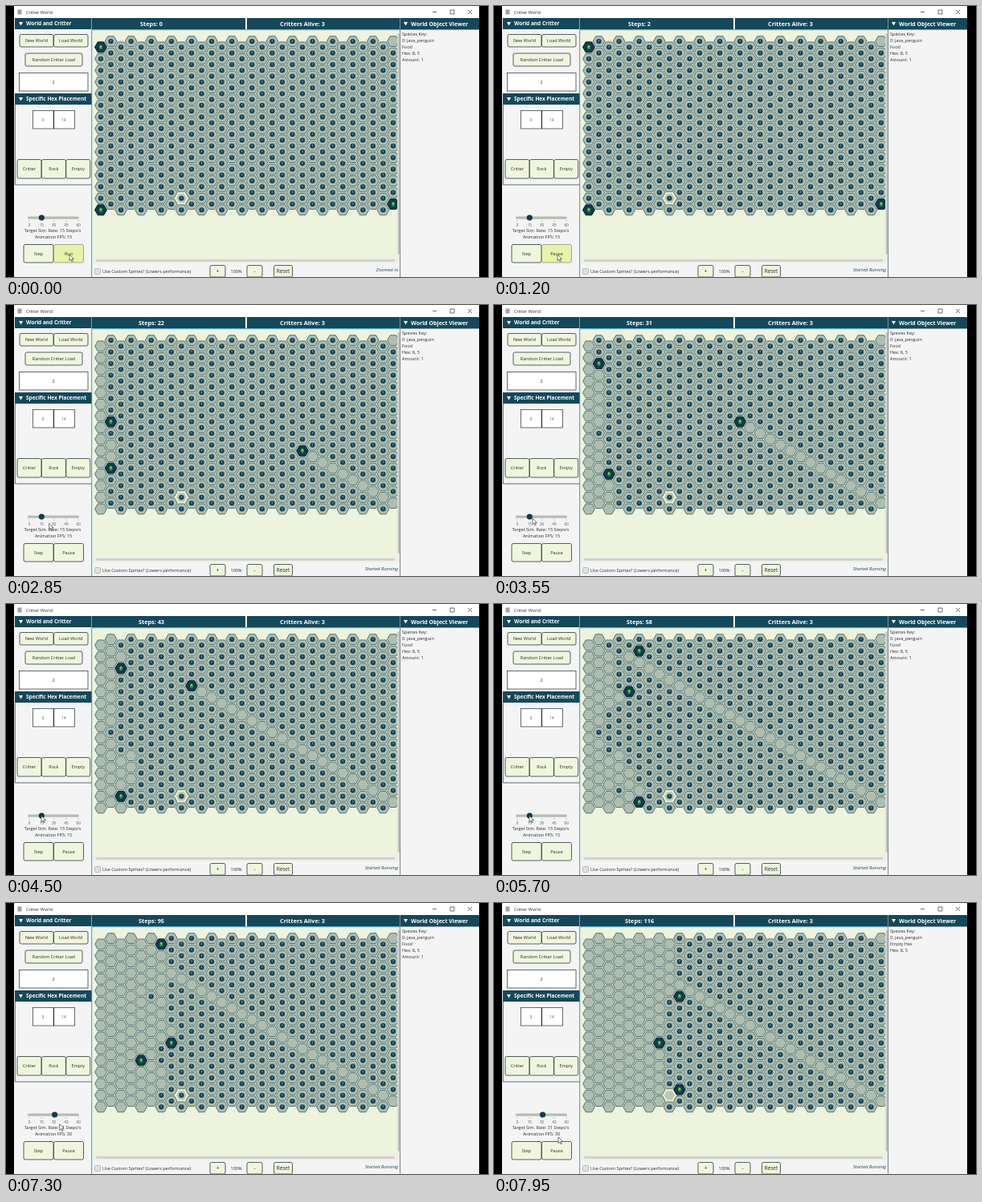
Recreate the animation shown at these times as an HTML page. Size 600 px wide and 338 px high, loop 8000 ms.

```html
<!DOCTYPE html>
<html lang="en">
<head>
<meta charset="utf-8">
<title>Critter World</title>
<style>
  html, body { margin: 0; width: 100%; height: 100%; overflow: hidden; background: #000; }
  svg { display: block; width: 100vw; height: 100vh; }
  text { font: 5.5px "Open Sans", "Noto Sans", sans-serif; fill: #2b2b2b; white-space: pre; }
  .mid { text-anchor: middle; }
  .end { text-anchor: end; }
  .head { font-weight: 700; font-size: 6.5px; fill: #fff; }
  .big { font-size: 7.3px; }
  .tick { font-size: 4.6px; fill: #555; }
  .bar { fill: #14485a; }
  .btn { fill: #f0f5de; stroke: #2a3c3c; stroke-width: .8; }
  .field { fill: #fff; stroke: #3c4a4c; stroke-width: .8; }
  .cell { fill: #aebfb1; stroke: #48666a; stroke-width: .9; }
  .picked { fill: #b9c8b5; stroke: #f0f2d2; stroke-width: 1.5; }
  .hot { fill: #e7f2aa; stroke-dasharray: 1 1; }
</style>
</head>
<body>
<svg viewBox="0 0 600 338" preserveAspectRatio="none">
  <defs>
    <path id="hex" d="M-7.4 0L-3.7-6.4H3.7L7.4 0L3.7 6.4H-3.7Z"/>
    <g id="food">
      <circle r="3.2" fill="#164458"/>
      <path d="M0-1.8V.5" stroke="#86a9ad" stroke-width=".9"/>
    </g>
    <g id="critter">
      <use href="#hex" fill="#12394c" stroke="#0b2a38"/>
      <ellipse rx="2.1" ry="2.9" fill="#2f8f3c"/>
      <circle cy="-.9" r="1.2" fill="#7be04c"/>
    </g>
    <clipPath id="view"><rect x="108" y="31" width="379" height="283"/></clipPath>
  </defs>

  <rect width="600" height="338"/>
  <rect x="10" width="579" height="338" fill="#f4f4f4"/>
  <rect x="10" width="579" height="15" fill="#fff"/>
  <rect x="14.5" y="4.5" width="5" height="6" fill="#9aa3a8"/>
  <text x="25" y="9.6">Critter World</text>
  <path d="M531 7.5h5M553 5h5v5h-5zM575 5l5 5m0-5l-5 5" fill="none" stroke="#333" stroke-width=".7"/>

  <rect x="107" y="30" width="383" height="291" fill="#eef3dd"/>
  <g id="grid" clip-path="url(#view)"></g>
  <rect x="108" y="314.5" width="379" height="5.5" fill="#eeeeea"/>
  <rect x="112" y="316" width="372" height="2.8" rx="1.4" fill="#cdd0c8"/>
  <rect x="487" y="30" width="3.5" height="290" fill="#eeeeec"/>
  <rect x="487.5" y="34" width="2.4" height="276" rx="1.2" fill="#c4c7c4"/>
  <path d="M106.7 338V29.7H490" fill="none" stroke="#3a9dc2"/>
  <path d="M490.6 15V338" stroke="#55666c" stroke-width=".8"/>

  <g class="bar">
    <rect x="11" y="15" width="95.5" height="14"/>
    <rect x="107" y="15" width="191" height="14"/>
    <rect x="300" y="15" width="190" height="14"/>
    <rect x="491" y="15" width="98" height="14.5"/>
    <rect x="11" y="109" width="95.5" height="14"/>
  </g>
  <rect x="298" y="15" width="2" height="14" fill="#fff"/>
  <path d="M16 20h5l-2.5 4.5zM16 114h5l-2.5 4.5zM495 20h5l-2.5 4.5z" fill="#fff"/>
  <text class="head" x="25" y="24.4">World and Critter</text>
  <text class="head" x="25" y="118.4">Specific Hex Placement</text>
  <text class="head" x="504" y="24.6" style="font-size:7px">World Object Viewer</text>
  <text class="head big mid" id="steps" x="181" y="24.6"></text>
  <text class="head big mid" x="369" y="24.6">Critters Alive: 3</text>

  <path d="M11.3 123V223H106.5" fill="none" stroke="#33464e" stroke-width=".8"/>
  <rect class="field" x="16.5" y="83.5" width="85.5" height="22.5"/>
  <text class="mid" x="59" y="97" font-style="italic">2</text>
  <rect class="field" x="33.5" y="130.5" width="52" height="22.5"/>
  <path d="M59.5 130.5V153" stroke="#111"/>
  <text class="mid tick" x="46" y="143.5">0</text>
  <text class="mid tick" x="72" y="143.5">14</text>
  <g id="buttons"></g>

  <rect x="27" y="262.5" width="64" height="3.2" rx="1.5" fill="#b3beb0"/>
  <g id="ticks"></g>
  <circle id="thumb" cy="264" r="3.6"/>
  <text class="mid" id="rate" x="58" y="281.7"></text>
  <text class="mid" id="fps" x="59" y="289.8"></text>

  <rect x="110.5" y="327.5" width="7" height="7" rx="1" fill="#dfe2dc" stroke="#aaa" stroke-width=".7"/>
  <text x="120" y="333">Use Custom Sprites? (Lowers performance)</text>
  <text class="mid" x="286.5" y="333">100%</text>
  <text class="end" id="status" x="488" y="331" style="font-size:5.8px;font-style:italic;fill:#14485a"></text>

  <text x="493" y="36.6">Species Key:</text>
  <text x="493" y="44.8">0: java_penguin</text>
  <text id="info1" x="493" y="53"></text>
  <text x="493" y="61.2">Hex: 8, 5</text>
  <text id="info2" x="493" y="69.4">Amount: 1</text>

  <path id="cursor" d="M0 0V7.6L1.8 6L3.1 8.8L4.3 8.2L3.1 5.5H5.4Z" fill="#fff" stroke="#222" stroke-width=".6"/>
</svg>
<script>
const $ = id => document.getElementById(id);
const LOOP = 8000, COLS = 30, ROWS = 15;

function add(parent, tag, attrs, text) {
  const el = document.createElementNS('http://www.w3.org/2000/svg', tag);
  for (const k in attrs) el.setAttribute(k, attrs[k]);
  if (text !== undefined) el.textContent = text;
  return parent.appendChild(el);
}

function setText(id, text) {
  if ($(id).textContent !== text) $(id).textContent = text;
}

// Linear interpolation over [key, ...values] rows.
function at(keys, k) {
  if (k <= keys[0][0]) return keys[0].slice(1);
  for (let i = 1; i < keys.length; i++) {
    const a = keys[i - 1], b = keys[i];
    if (k <= b[0]) {
      const p = (k - a[0]) / (b[0] - a[0]);
      return a.slice(1).map((v, j) => v + (b[j + 1] - v) * p);
    }
  }
  return keys[keys.length - 1].slice(1);
}

const stepKeys = [[1030, 0], [1950, 11.5], [4500, 43.5], [5700, 58.4],
  [6150, 64], [6500, 70.5], [6800, 78.5], [7930, 116.3]];
const mouseKeys = [[2100, 79, 310], [2900, 52, 270], [3550, 48, 266], [3900, 44, 264],
  [6200, 44, 264], [6500, 50, 264], [7000, 60, 264], [7150, 60, 264],
  [7600, 80, 299], [7950, 80, 292]];

// Critter routes: move number, column, height in half cells.
const upper = [[0, 0, 1], [7, 0, 15], [9, 1, 14], [16, 1, 0], [20, 2, 5], [23, 2, 11],
  [27, 4, 9], [29, 3, 4], [33, 2, 13], [38, 1, 16], [47, 4, 21], [52, 7, 12], [56, 7, 18]];
const lower = [[0, 0, 29], [6, 0, 17], [7, 1, 18], [11.5, 1, 28], [12, 2, 29], [15, 2, 21],
  [16, 3, 20], [20, 2, 27], [22, 4, 29], [24, 4, 23], [27, 5, 28], [31, 6, 23],
  [33, 5, 24], [39, 5, 12], [47, 7, 18], [54, 7, 28], [56, 9, 26]];
const diagonal = [[0, 29, 28], [25, 4, 3], [27, 5, 2], [29, 3, 0], [32, 6, 1], [33, 6, 3],
  [37, 6, 11], [41, 5, 4], [50, 7, 0], [51, 8, 1], [55, 8, 9], [56, 9, 10]];
const routes = [upper, lower, diagonal];

function cellAt(route, move) {
  const [x, y] = at(route, move);
  const c = Math.round(x), odd = 1 - c % 2;
  return [c, 2 * Math.round((y - odd) / 2) + odd];
}

const place = ([c, h]) => `translate(${118 + 12.55 * c} ${44.1 + 7.25 * h})`;

// First move at which each cell's food is gone.
const eaten = { '29,0': -1 };
for (const route of routes)
  for (let m = 0; m <= 56; m += .25) {
    const key = String(cellAt(route, m));
    eaten[key] = Math.min(eaten[key] ?? 99, Math.ceil(m));
  }

const foods = [];
for (let c = 0; c < COLS; c++)
  for (let r = 0; r < ROWS; r++) {
    const cell = [c, 2 * r + 1 - c % 2], key = String(cell);
    const g = add($('grid'), 'g', { transform: place(cell) });
    add(g, 'use', { href: '#hex', class: key === '8,27' ? 'picked' : 'cell' });
    const food = add(g, 'use', { href: '#food' });
    // Leftovers in the left block are cleared column by column.
    const sweep = c < 8 ? 34 + 3 * c : 99;
    foods.push([food, Math.min(eaten[key] ?? 99, sweep)]);
  }
const critters = routes.map(() => add($('grid'), 'use', { href: '#critter' }));

function button(x, y, w, h, label, size = 5.5) {
  const box = add($('buttons'), 'rect', { x, y, width: w, height: h, rx: 2, class: 'btn' });
  const text = add($('buttons'), 'text',
    { x: x + w / 2, y: y + h / 2 + 2, class: 'mid', style: `font-size:${size}px` }, label);
  return { box, text };
}
button(17, 35.5, 42, 15.5, 'New World');
button(59.5, 35.5, 42.5, 15.5, 'Load World');
button(24, 59, 71, 16, 'Random Critter Load');
['Critter', 'Rock', 'Empty'].forEach((s, i) => button(14 + 30.4 * i, 191.5, 30, 23.5, s));
button(22, 297.5, 37, 22.5, 'Step');
const run = button(59.5, 297.5, 37, 22.5, 'Run');
button(254, 323.5, 19, 14.5, '+', 6.5);
button(300, 323.5, 19, 14.5, '-', 6.5);
button(333.5, 323.5, 23, 14.5, 'Reset', 6.4);

for (let v = 0; v <= 60; v += 15) {
  const x = 29 + v * 1.02;
  add($('ticks'), 'path', { d: `M${x} 267V269`, stroke: '#888', 'stroke-width': .5 });
  add($('ticks'), 'text', { x, y: 275.2, class: 'mid tick' }, v);
}

function draw(t) {
  const steps = Math.floor(at(stepKeys, t)[0]);
  const move = Math.max(0, Math.floor((steps - 3) / 2));
  const [mx, my] = at(mouseKeys, t);
  const started = t >= 850;

  setText('steps', 'Steps: ' + steps);
  setText('status', started ? 'Started Running' : 'Zoomed in');
  run.text.textContent = started ? 'Pause' : 'Run';
  run.box.classList.toggle('hot', mx > 59.5 && my > 297.5 && t < 7000);

  for (const [el, when] of foods) el.style.display = move >= when ? 'none' : '';
  critters.forEach((el, i) => el.setAttribute('transform', place(cellAt(routes[i], move))));

  const gone = move >= eaten['8,27'];
  setText('info1', gone ? 'Empty Hex' : 'Food');
  $('info2').style.display = gone ? 'none' : '';

  const rate = t < 6200 ? 15 : t > 7000 ? 31 : Math.round(mx - 29);
  setText('rate', `Target Sim. Rate: ${rate} Steps/s`);
  setText('fps', 'Animation FPS: ' + Math.min(rate, 30));
  $('thumb').setAttribute('cx', 29 + rate * 1.02);
  $('thumb').setAttribute('fill', t > 6200 && t < 7100 ? '#dfe88e' : '#14394a');
  $('cursor').setAttribute('transform', `translate(${mx} ${my})`);
}

const begin = performance.now();
function tick() {
  draw((performance.now() - begin) % LOOP);
  requestAnimationFrame(tick);
}
draw(0);
tick();
</script>
</body>
</html>
```
